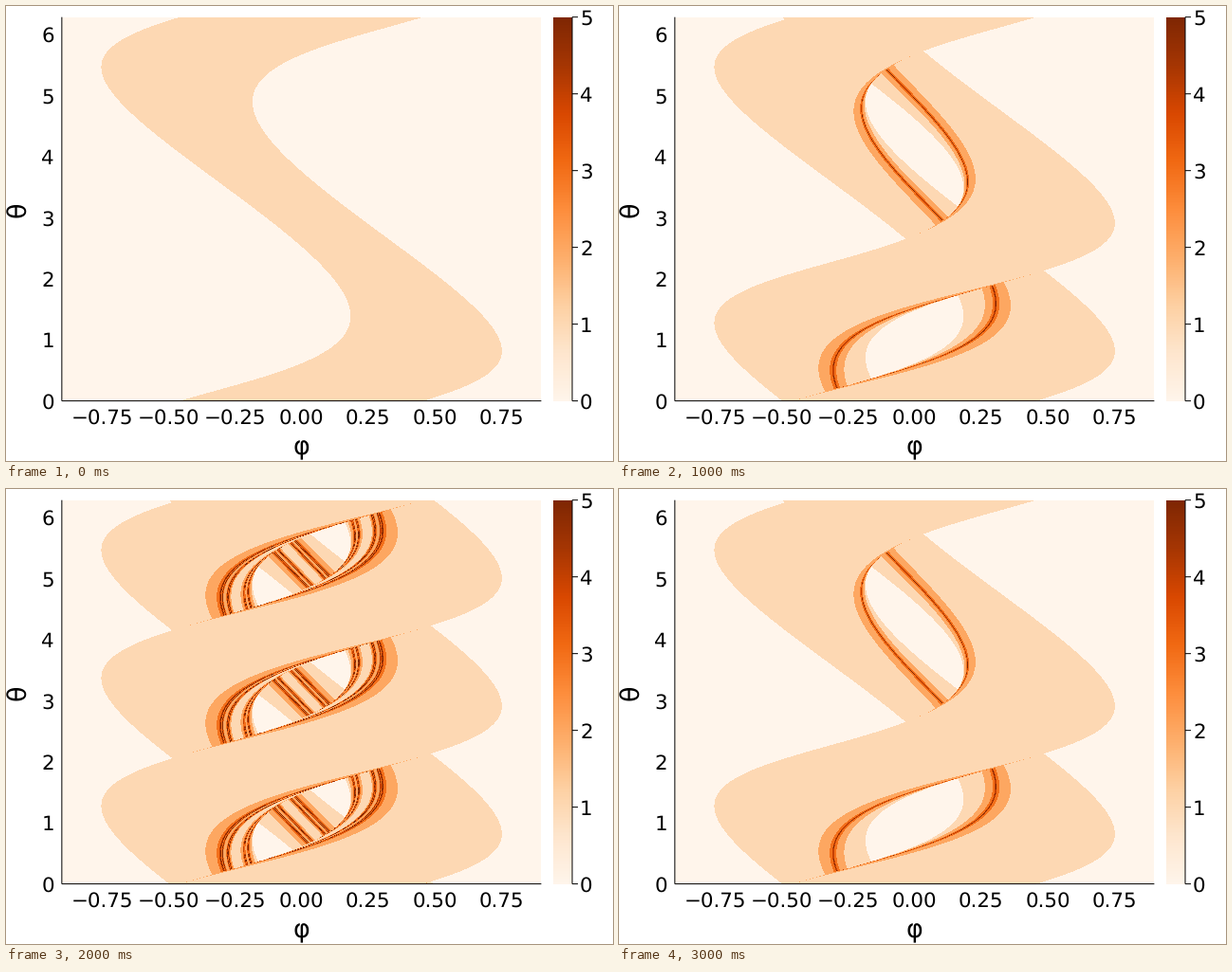
Recreate the animation shown at these times as a matplotlib script. Size 640 px wide and 480 px high, loop 4 s.

```python
import numpy as np
import matplotlib.pyplot as plt
from matplotlib.animation import FuncAnimation

# Bounce counts for rays shot inward from a circle at unit discs on a triangle.
W, H, DPI = 640, 480, 100
LEFT, RIGHT, TOP, BOTTOM = 59, 564, 12, 417
AXIS_LEFT, AXIS_RIGHT, AXIS_TOP, AXIS_BOTTOM = 58.85, 564.4, 11.7, 416.6
BAR_LEFT, BAR_RIGHT = 577, 597
START_RADIUS, DISC_OFFSET, MAX_HITS = 4.0, np.sqrt(3), 5
PHI_MAX, THETA_MAX = 0.9, 2 * np.pi
DISC_COUNTS = [1, 2, 3, 2]

plt.rcParams.update({"font.family": "DejaVu Sans", "text.hinting": "none"})


def count_hits(n_discs):
    x = np.arange(LEFT, RIGHT) + 0.5
    y = np.arange(TOP, BOTTOM) + 0.5
    phi = PHI_MAX * (2 * (x - AXIS_LEFT) / (AXIS_RIGHT - AXIS_LEFT) - 1)
    theta = THETA_MAX * (AXIS_BOTTOM - y) / (AXIS_BOTTOM - AXIS_TOP)
    phi, theta = np.meshgrid(phi, theta)
    pos = START_RADIUS * np.exp(1j * theta)
    ray = -np.exp(1j * (theta + phi))
    centers = DISC_OFFSET * np.exp(2j * np.pi * np.arange(n_discs) / 3)
    hits = np.zeros(phi.shape)

    for _ in range(MAX_HITS):
        nearest = np.full(phi.shape, np.inf)
        target = np.zeros(phi.shape, complex)
        for center in centers:
            gap = center - pos
            along = (gap * ray.conj()).real
            chord = along**2 - np.abs(gap) ** 2 + 1
            dist = along - np.sqrt(np.maximum(chord, 0))
            closer = (chord > 0) & (along > 0) & (dist < nearest)
            nearest[closer] = dist[closer]
            target[closer] = center
        hit = np.isfinite(nearest)
        pos = pos + np.where(hit, nearest, 0) * ray
        normal = pos - target
        bounced = ray - 2 * (ray * normal.conj()).real * normal
        ray = np.where(hit, bounced, ray)
        hits += hit
    return hits


fig = plt.figure(figsize=(W / DPI, H / DPI), dpi=DPI, facecolor="white")
ax = fig.add_axes([0, 0, 1, 1])
ax.axis("off")


def label(x, y, text, size=21.4, **kwargs):
    ax.text(x, y, text, fontsize=size * 72 / DPI, va="baseline",
            rotation_mode="anchor", **kwargs)


def line(xs, ys):
    ax.plot(xs, ys, color="black", lw=72 / DPI, snap=False,
            solid_capstyle="butt")


def height(fraction):
    return AXIS_BOTTOM - fraction * (AXIS_BOTTOM - AXIS_TOP)


maps = {n: count_hits(n) for n in set(DISC_COUNTS)}
style = dict(cmap="Oranges", aspect="auto", interpolation="nearest")
heatmap = ax.imshow(maps[1], vmin=0, vmax=MAX_HITS,
                    extent=(LEFT, RIGHT, BOTTOM, TOP), **style)
ax.imshow(np.linspace(1, 0, 256)[:, None],
          extent=(BAR_LEFT, BAR_RIGHT, BOTTOM, TOP), **style)
ax.set(xlim=(0, W), ylim=(H, 0))

line([AXIS_LEFT, AXIS_LEFT], [AXIS_TOP, AXIS_BOTTOM])
line([AXIS_LEFT, AXIS_RIGHT], [AXIS_BOTTOM, AXIS_BOTTOM])
line([BAR_RIGHT, BAR_RIGHT], [AXIS_TOP, AXIS_BOTTOM])

for value in np.arange(-0.75, 0.8, 0.25):
    x = AXIS_LEFT + (value / PHI_MAX + 1) / 2 * (AXIS_RIGHT - AXIS_LEFT)
    label(x, 441, f"{value:.2f}".replace("-", "\u2212"), ha="center")
for value in range(7):
    label(51, height(value / THETA_MAX) + 8, str(value), ha="right")
for value in range(MAX_HITS + 1):
    y = height(value / MAX_HITS)
    line([BAR_RIGHT, BAR_RIGHT + 6], [y, y])
    label(605, y + 8, str(value), ha="left")
label(311.5, 473, "φ", 27, ha="center")
label(21.5, 214.5, "θ", 27, ha="center", rotation=90)


def update(frame):
    heatmap.set_data(maps[DISC_COUNTS[frame]])
    return [heatmap]


anim = FuncAnimation(fig, update, frames=len(DISC_COUNTS), interval=1000,
                     repeat=True, repeat_delay=0)
plt.show()
```
